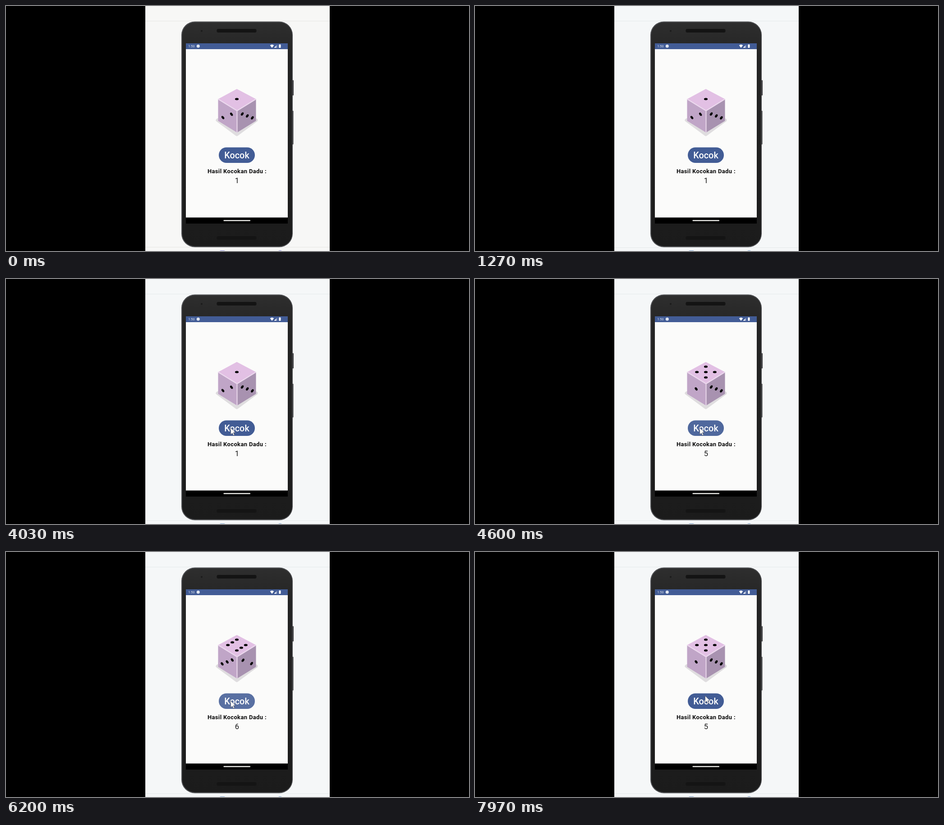
Write an HTML page with a canvas that moves like this. It is 1027 by 545 pixels and loops after 8 s.

```html
<!DOCTYPE html>
<html lang="id">
<head>
<meta charset="utf-8">
<title>Kocok Dadu</title>
<style>
  html, body { margin: 0; width: 100%; height: 100%; overflow: hidden; background: #000; }
  canvas { display: block; }
</style>
</head>
<body>
<canvas id="stage" width="1027" height="545"></canvas>
<script>
const ctx = document.getElementById('stage').getContext('2d');
const LOOP = 8000;
const CX = 512;
const FONT = 'Roboto, "Open Sans", sans-serif';

const span = (t, a, b) => Math.min(1, Math.max(0, (t - a) / (b - a)));
const ease = p => p * p * (3 - 2 * p);
const lerp = (a, b, p) => a + (b - a) * p;
const mix = (a, b, p) => `rgb(${a.map((v, i) => Math.round(lerp(v, b[i], p)))})`;

function rect(x, y, w, h, color) {
  ctx.fillStyle = color;
  ctx.fillRect(x, y, w, h);
}

function round(x, y, w, h, r, color) {
  ctx.beginPath();
  ctx.roundRect(x, y, w, h, r);
  ctx.fillStyle = color;
  ctx.fill();
}

function oval(x, y, rx, ry, color, tilt = 0) {
  ctx.beginPath();
  ctx.ellipse(x, y, rx, ry, tilt, 0, Math.PI * 2);
  ctx.fillStyle = color;
  ctx.fill();
}

function trace(points) {
  ctx.beginPath();
  points.forEach(([x, y]) => ctx.lineTo(x, y));
}

function poly(points, color) {
  trace(points);
  ctx.fillStyle = color;
  ctx.fill();
}

function line(points, color, width) {
  trace(points);
  ctx.strokeStyle = color;
  ctx.lineWidth = width;
  ctx.stroke();
}

function label(str, x, y, font, color, spacing = 0) {
  ctx.font = `${font} ${FONT}`;
  ctx.letterSpacing = spacing + 'px';
  ctx.textAlign = 'center';
  ctx.fillStyle = color;
  ctx.fillText(str, x, y);
}

function drawPage(t) {
  const tint = (span(t, 70, 330) + span(t, 870, 1270)) / 2;
  const rule = mix([230, 230, 228], [229, 233, 235], tint);
  rect(0, 0, 1027, 545, '#000');
  rect(309, 0, 409, 545, mix([247, 247, 246], [245, 247, 248], tint));
  rect(309, 33, 409, 1, rule);
  rect(309, lerp(536, 537, tint), 409, 1, rule);

  ctx.strokeStyle = mix([140, 140, 215], [120, 158, 204], tint);
  ctx.lineWidth = 1;
  ctx.beginPath();
  ctx.roundRect(474.5, 544.5, 11, 8, 1);
  ctx.moveTo(614, 550);
  ctx.arc(608, 550, 6, 0, Math.PI * 2);
  ctx.stroke();
}

function drawPhone() {
  round(634, 165, 4, 34, 1, '#3c3c3e');
  round(634, 233, 3.5, 75, 1, '#3c3c3e');
  round(389, 34.5, 247, 502, 30, '#4b4c4f');
  const body = ctx.createLinearGradient(0, 36, 0, 535);
  body.addColorStop(0, '#2e2e2e');
  body.addColorStop(0.15, '#242424');
  body.addColorStop(1, '#1b1b1b');
  round(391, 36.5, 243.5, 498, 28, body);
  for (const y of [51, 512]) round(467.5, y, 88, 8, 3, '#141414');
  oval(434, 55.5, 2, 2, '#1b1b1b');

  rect(399, 83, 226, 401, '#fbfbfa');
  rect(399, 83, 226, 13, '#425c96');
  rect(399, 470.5, 226, 13.5, '#000');
  round(482.5, 476, 59.5, 2.5, 1.2, '#e8e8e4');
}

function drawStatus() {
  label('1:50', 411.5, 92, '400 7.2px', '#e6ebf4');
  oval(426.3, 89.3, 3.5, 3.5, '#dfe5ef');
  // wifi, signal, battery
  ctx.beginPath();
  ctx.moveTo(590, 93);
  ctx.arc(590, 93, 7, -Math.PI * 0.71, -Math.PI * 0.29);
  ctx.fillStyle = '#fff';
  ctx.fill();
  const wedge = size => [[594.5, 93], [594.5 + size, 93], [594.5 + size, 93 - size]];
  poly(wedge(7), '#91a1c5');
  poly(wedge(4.5), '#edf1f8');
  round(605.3, 85.6, 4.2, 7.4, 0.8, '#fff');
}

// Each side shows a row of pips along its diagonal; the top is a small lattice.
const row = n => n === 1 ? [0] : n === 2 ? [-0.85, 0.85] : [-1, 0, 1];

function topPips(value) {
  if (value === 1) return [[0, 0]];
  const ends = [-1, 1];
  const pips = ends.flatMap(u => ends.map(v => [u, v]));
  return value === 5 ? [...pips, [0, 0]] : [...pips, ...ends.map(u => [u, 0])];
}

function drawPips(value, left, right) {
  const ink = '#050505';
  for (const [u, v] of topPips(value)) {
    oval(CX + 9.9 * (u - v), 207 + 6 * (u + v), 4.1, 2.5, ink);
  }
  for (const [count, dir] of [[left, -1], [right, 1]]) {
    for (const k of row(count)) {
      oval(CX + 0.9 + dir * 22.3 + k * 11.2, 244.5 + dir * k * 4.3, 4.1, 2.5, ink, -dir * 0.95);
    }
  }
}

function drawDie(value) {
  const half = 42, height = 48.5;
  const top = [CX, 184.5], west = [CX - half + 0.5, 207], east = [CX + half + 0.5, 207];
  const mid = [CX + 0.5, 233];
  const drop = ([x, y]) => [x, y + height];

  const shadow = [[CX, 234], [CX + 43, 254], [CX, 286], [CX - 43, 254], [CX, 234]];
  ctx.lineJoin = 'round';
  poly(shadow, '#dfdddf');
  line(shadow, '#dfdddf', 7);

  poly([west, mid, drop(mid), drop(west)], '#c0a5c7');
  poly([mid, east, drop(east), drop(mid)], '#a892b0');
  poly([top, east, mid, west], '#e2c0e4');
  line([west, mid, east], '#ecd9ee', 2.2);
  line([mid, drop(mid)], '#e3d0e6', 2.4);

  const sides = { 1: [2, 3], 5: [1, 3], 6: [3, 2] };
  drawPips(value, ...sides[value]);
}

const ROLLS = [{ at: 4030, value: 5 }, { at: 5800, value: 6 }, { at: 7030, value: 5 }];
const RELEASE = 130, RIPPLE = 800;

function valueAt(t) {
  const done = ROLLS.filter(r => t >= r.at + RELEASE);
  return done.length ? done[done.length - 1].value : 1;
}

function drawButton(t) {
  round(472, 314.5, 80, 34.5, 17, '#425c95');
  const roll = ROLLS.find(r => t > r.at && t < r.at + RIPPLE);
  if (roll) {
    const grow = ease(span(t, roll.at, roll.at + RIPPLE / 2));
    const fade = 1 - span(t, roll.at + RIPPLE / 2, roll.at + RIPPLE);
    ctx.save();
    ctx.clip();
    const r = 4 + 42 * grow;
    oval(lerp(498, CX, grow), 332, r, r, `rgba(255,255,255,${0.12 * fade})`);
    ctx.restore();
  }
  label('Kocok', CX, 339, '500 19.8px', '#fff');
}

const MOVES = [
  { from: 2030, to: 2170, x: 697, y: 519 },
  { from: 2900, to: 3670, x: 497, y: 329 },
  { from: 3730, to: 3800, x: 498, y: 331 },
  { from: 7870, to: 7970, x: 510, y: 320 }
];

function drawPointer(t) {
  if (t < MOVES[0].from) return;
  let x = 717, y = 541;
  for (const m of MOVES) {
    const p = ease(span(t, m.from, m.to));
    x = lerp(x, m.x, p);
    y = lerp(y, m.y, p);
  }
  ctx.save();
  ctx.beginPath();
  ctx.rect(309, 0, 409, 545);
  ctx.clip();
  ctx.translate(x, y);
  const arrow = [[0.5, 0], [0.5, 15], [4, 11.7], [6.4, 17], [8.8, 16], [6.4, 10.8], [11, 10.6], [0.5, 0]];
  poly(arrow, '#fff');
  line(arrow, '#4d505c', 0.8);
  ctx.restore();
}

function draw(t) {
  const value = valueAt(t);
  drawPage(t);
  drawPhone();
  drawStatus();
  drawDie(value);
  drawButton(t);
  label('Hasil Kocokan Dadu :', CX + 0.5, 372, '700 13px', '#0a0a0a', 0.36);
  label(value, CX + 0.5, 393.5, '400 16.5px', '#151515');
  drawPointer(t);
}

function tick() {
  draw(performance.now() % LOOP);
  requestAnimationFrame(tick);
}
tick();
</script>
</body>
</html>
```
